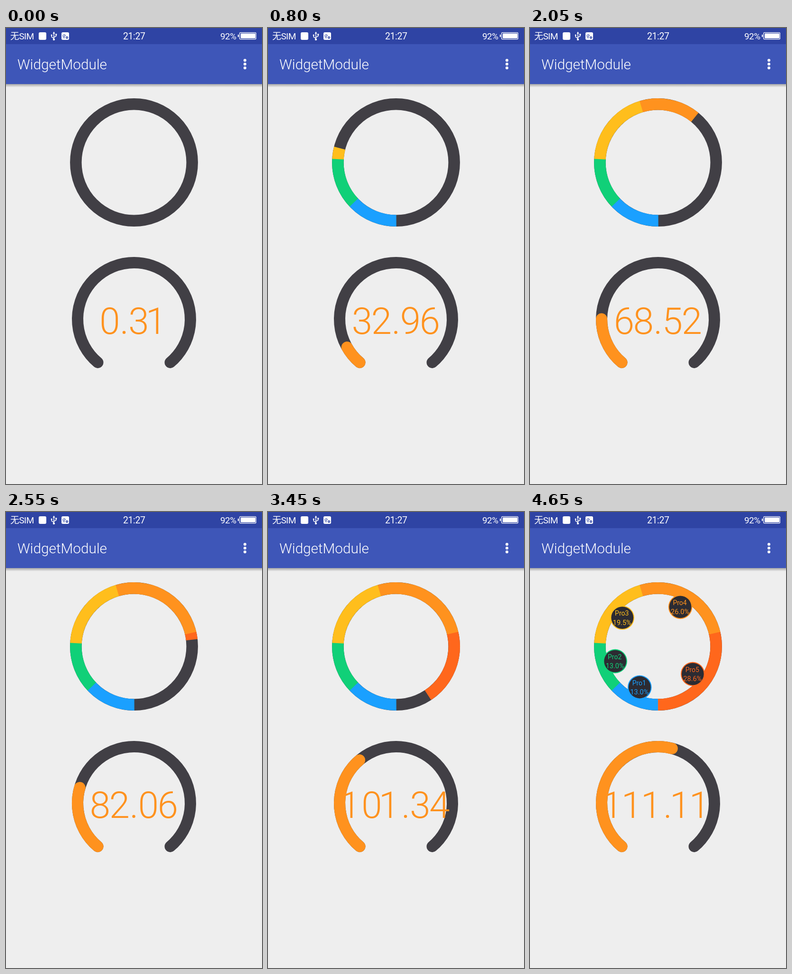
An HTML page with a canvas that plays this animation: 540 px wide and 960 px high, repeating every 4700 ms.

```html
<!DOCTYPE html>
<html lang="en">
<head>
<meta charset="utf-8">
<title>WidgetModule</title>
<style>
html, body { margin: 0; width: 100%; height: 100%; overflow: hidden; background: #eee; }
canvas { display: block; }
</style>
</head>
<body>
<canvas id="stage" width="540" height="960"></canvas>
<script>
const ctx = document.getElementById('stage').getContext('2d');
const LOOP = 4700, STEP = 50, DURATION = 6000, HEAD_START = 1400;
const TRACK = '#413f45', ORANGE = '#ff921e', BAR = '#2f44a4';
const RAD = Math.PI / 180;
const parts = [
  { value: 10, color: '#1aa0ff' },
  { value: 10, color: '#10d078' },
  { value: 15, color: '#ffbe1c' },
  { value: 20, color: ORANGE },
  { value: 22, color: '#ff671c' }
];
const total = parts.reduce((sum, p) => sum + p.value, 0);

function text(str, x, y, size, color, { weight = 400, align = 'left', spacing = 0 } = {}) {
  ctx.font = `${weight} ${size}px Roboto, "Noto Sans CJK SC", sans-serif`;
  ctx.textAlign = align;
  ctx.letterSpacing = spacing + 'px';
  ctx.fillStyle = color;
  ctx.fillText(str, x, y);
}

function rect(x, y, w, h, color, r = 0) {
  ctx.fillStyle = color;
  ctx.beginPath();
  ctx.roundRect(x, y, w, h, r);
  ctx.fill();
}

function disc(x, y, r, color) {
  ctx.fillStyle = color;
  ctx.beginPath();
  ctx.arc(x, y, r, 0, 7);
  ctx.fill();
}

function arc(y, r, from, sweep, width, color, cap = 'butt') {
  ctx.beginPath();
  ctx.arc(270, y, r, from * RAD, (from + sweep) * RAD);
  ctx.lineWidth = width;
  ctx.lineCap = cap;
  ctx.strokeStyle = color;
  ctx.stroke();
}

function usb(x, y, scale, color) {
  ctx.save();
  ctx.translate(x, y);
  ctx.scale(scale, scale);
  ctx.strokeStyle = color;
  ctx.lineWidth = 1.6;
  ctx.lineCap = 'butt';
  ctx.stroke(new Path2D('M0 -7V8M0 5L-5 2V-2M0 3L5 0V-3'));
  ctx.fillStyle = color;
  ctx.fill(new Path2D('M-2.6 -5.5L0 -10L2.6 -5.5Z'));
  disc(0, 7.5, 2.2, color);
  disc(-5, -2, 1.7, color);
  rect(3.4, -5, 3.2, 3.2, color);
  ctx.restore();
}

function header() {
  const shadow = ctx.createLinearGradient(0, 118, 0, 125);
  shadow.addColorStop(0, 'rgba(0,0,0,.3)');
  shadow.addColorStop(1, 'rgba(0,0,0,0)');
  rect(0, 118, 540, 7, shadow);
  rect(0, 0, 540, 34, BAR);
  rect(0, 34, 540, 84, '#3e56b8');

  text('无SIM', 9, 24, 19, '#fff', { spacing: -0.6 });
  text('21:27', 247, 24, 19.5, '#fff', { spacing: -0.4 });
  text('92%', 452, 24, 19, '#fff', { spacing: -0.6 });
  rect(69, 9, 16, 16, '#fff', 3);
  usb(101, 17, 0.95, '#fff');
  rect(117, 9, 16, 16, '#fff', 3);
  usb(122.5, 17, 0.5, BAR);
  disc(128.5, 20, 2.6, BAR);
  disc(128.5, 20, 1, '#fff');

  rect(489, 14, 2, 5, '#fff');
  ctx.strokeStyle = '#fff';
  ctx.lineWidth = 1.2;
  ctx.beginPath();
  ctx.roundRect(492.6, 9.6, 34.8, 14, 2);
  ctx.stroke();
  rect(495, 11.5, 31, 10.2, '#fff', 1);

  text('WidgetModule', 24, 87, 29.8, '#fff', { weight: 300 });
  for (const y of [68, 76, 84]) disc(504, y, 3, '#fff');
}

function ring(shown, done) {
  arc(283, 122.7, 0, 360, 24.5, TRACK);
  const overlap = 0.3; // hides the seams between neighbours
  let start = 0;
  for (const p of parts) {
    const sweep = 360 * p.value / total;
    p.middle = (90 + start + sweep / 2) * RAD;
    if (shown > start) {
      arc(283, 122.7, 90 + start - overlap, Math.min(sweep, shown - start) + overlap, 24.5, p.color);
    }
    start += sweep;
  }
  if (done) parts.forEach(badge);
}

function badge({ value, color, middle }, i) {
  const x = 269 + 95 * Math.cos(middle), y = 281.8 + 95 * Math.sin(middle);
  disc(x, y, 25.3, color);
  disc(x, y, 23.4, '#2c2b32');
  text('Pro' + (i + 1), x - 1, y - 4.3, 14, color, { align: 'center' });
  text((100 * value / total).toFixed(1) + '%', x - 0.5, y + 15.2, 14.5, color, { align: 'center' });
}

function gauge(sweep, value) {
  arc(613, 119, 130, 280, 24, TRACK, 'round');
  if (sweep) arc(613, 119, 130, sweep, 24, ORANGE, 'round');
  const chars = [...value.toFixed(2)];
  const advance = c => c === '.' ? 20 : 41;
  let x = 270 - chars.reduce((sum, c) => sum + advance(c), 0) / 2;
  for (const c of chars) {
    const nudge = c === '1' ? -4.5 : 0; // the narrow digit sits left in its cell
    text(c, x + advance(c) / 2 + nudge, 644, 78, ORANGE, { weight: 300, align: 'center' });
    x += advance(c);
  }
}

const ease = x => (1 - Math.cos(Math.PI * x)) / 2;

function draw() {
  const t = Math.floor(performance.now() % LOOP / STEP) * STEP;
  // The opening pose is held for one step, then the motion is already under way.
  const opening = t < STEP;
  const progress = opening ? 0.0337 : Math.min(1, (t + HEAD_START) / DURATION);
  const done = progress === 1;
  // The arcs trail the number slightly.
  const arcs = opening ? 0 : done ? 1 : progress - 0.005;

  rect(0, 0, 540, 960, '#eee');
  header();
  ring(360 * ease(arcs), done);
  gauge(154.5 * arcs * arcs, 111.11 * ease(progress));
  requestAnimationFrame(draw);
}
draw();
</script>
</body>
</html>
```
